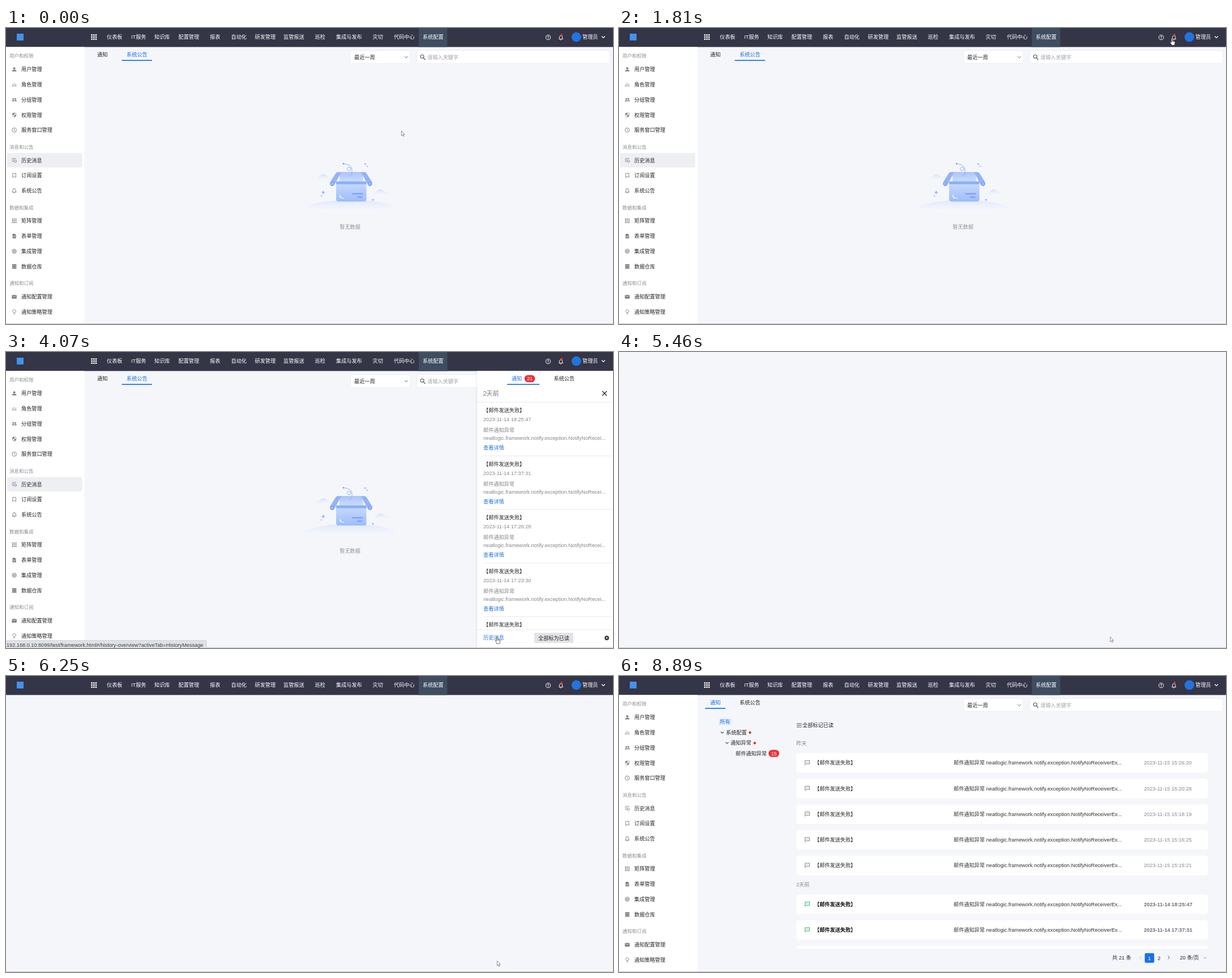
An HTML page that plays this animation: 1072 by 522 pixels, repeating every 9510 ms.

```html
<!DOCTYPE html>
<html lang="zh-CN">
<head>
<meta charset="utf-8">
<title>历史消息</title>
<style>
html, body { margin: 0; width: 100%; height: 100%; overflow: hidden; background: #f4f6fa; }
svg { display: block; width: 1072px; height: 522px; }
text { font-family: "Liberation Sans", "Noto Sans CJK SC", "Noto Sans CJK", sans-serif; white-space: pre; }
</style>
</head>
<body>
<svg id="stage" viewBox="0 0 1072 522" xmlns="http://www.w3.org/2000/svg"></svg>
<script>
const LOOP = 9510;
const BLUE = '#1a70eb', INK = '#262626', GREY = '#85878c', RED = '#ee2f30', ICON = '#7c7c7c', PALE = '#a2a2a2';
const SIZE = 9.17;

// y is the visual middle of the line
const text = (x, y, s, fill = INK, size = SIZE, extra = '') =>
  `<text x="${x}" y="${y + size * 0.37}" font-size="${size}" fill="${fill}" ${extra}>${s}</text>`;
const rect = (x, y, w, h, fill, r = 0, extra = '') =>
  `<rect x="${x}" y="${y}" width="${w}" height="${h}" rx="${r}" fill="${fill}" ${extra}/>`;
const disc = (x, y, r, fill) => `<circle cx="${x}" cy="${y}" r="${r}" fill="${fill}"/>`;
const ring = (x, y, r, color, w = 0.9) =>
  `<circle cx="${x}" cy="${y}" r="${r}" fill="none" stroke="${color}" stroke-width="${w}"/>`;
const line = (d, color, w = 1) =>
  `<path d="${d}" fill="none" stroke="${color}" stroke-width="${w}"/>`;
const shape = (d, fill) => `<path d="${d}" fill="${fill}"/>`;
const at = (x, y, body) => `<g transform="translate(${x} ${y})">${body}</g>`;
const group = (id, body) => `<g id="${id}">${body}</g>`;
const down = (x, y, color, r = 2.6, w = 1.1) =>
  line(`M${x - r} ${y - r / 2}l${r} ${r}l${r} ${-r}`, color, w);
const badge = (x, y, w, s) =>
  rect(x, y - 6.3, w, 12.6, RED, 6.3) + text(x + w / 2, y, s, '#fff', SIZE, 'text-anchor="middle"');

function dots(size, gap, fill) {
  let s = '';
  for (let i = 0; i < 9; i++)
    s += rect((i % 3 - 1) * gap - size / 2, (Math.floor(i / 3) - 1) * gap - size / 2, size, size, fill);
  return s;
}
const bell = color =>
  line('M-3.6 2.6H3.6L2.6 1.2V-.8A2.6 2.6 0 0 0-2.6-.8V1.2ZM-1 4H1M0-4.4V-3.4', color, 0.95);

function header() {
  const menu = [[178, '仪表板'], [221, 'IT服务'], [262, '知识库'], [304.5, '配置管理'], [360, '报表'],
    [397.5, '自动化'], [439.5, '研发管理'], [490, '监管报送'], [545.5, '巡检'], [583, '集成与发布'],
    [647.5, '灾切'], [685, '代码中心'], [736, '系统配置']];
  return rect(0, 0, 1072, 33.5, '#343546') + rect(729, 0, 50.3, 33.5, '#3e4d60') +
    rect(19, 10, 12, 12, '#4292f0') + at(155.3, 16, dots(2.5, 3.7, '#fff')) +
    menu.map(([x, s]) => text(x, 16, s, '#fff')).join('') +
    ring(957.5, 16.5, 4.1, '#fff', 1) + text(957.5, 16.6, '?', '#fff', 6.4, 'text-anchor="middle" font-weight="bold"') +
    at(980, 17, bell('#fff')) + disc(981.2, 12.3, 2, RED) +
    disc(1007.3, 16, 8.5, '#2274e0') + text(1018, 16, '管理员', '#fff') + down(1055, 16, '#fff', 2.9, 1.3);
}

const icons = [
  disc(0, -1.8, 1.9, ICON) + shape('M-3.8 3.6V2.4C-3.8.2 3.8.2 3.8 2.4V3.6Z', ICON),
  line('M-3.8 2.6C-3.8.6-1.6.6-1.6 2.6M-1.9 2.6C-1.9-.2 1.9-.2 1.9 2.6M1.6 2.6C1.6.6 3.8.6 3.8 2.6M-4.2 2.8H4.2', PALE, .7) +
    ring(0, -1.6, 1.1, PALE, .7) + ring(-2.7, -.2, .8, PALE, .6) + ring(2.7, -.2, .8, PALE, .6),
  disc(-1.7, -1.3, 1.4, ICON) + disc(1.9, -1.3, 1.4, ICON) + shape('M-4.4 2.7C-4.4 0 .8 0 .8 2.7ZM1.4 2.7C1.4 1.6 1 1 .6.7C2 .3 4.4.8 4.4 2.7Z', ICON),
  line('M0-3.8L3.2-2.4V0C3.2 2 2 3.2 0 3.9C-2 3.2-3.2 2-3.2 0V-2.4Z', ICON, .8) +
    shape('M0-3.8V0H3.2C3.2 2 2 3.2 0 3.9V0H-3.2V-2.4Z', ICON),
  ring(0, 0, 3.9, ICON) + line('M0-2.4V.2L1.8 1.2', ICON, .9),
  line('M-4-3.2H3.6M-4-.6H0M-4 2H-.6', ICON, .9) + ring(2, 1.6, 2, ICON),
  line('M-2.8-3.7H2.8V3.6L0 1.6L-2.8 3.6Z', ICON, .9),
  bell(ICON),
  dots(1.9, 3, ICON),
  shape('M-3-4H1L3-2V4H-3Z', ICON) + line('M-1.7-.2H1.7M-1.7 1.8H1.7', '#fff', .8),
  ring(0, 0, 3.8, ICON) + ring(0, 0, 2.1, ICON) + disc(0, 0, .9, ICON),
  [-2.9, 0, 2.9].map(y => rect(-4, y - 1.2, 8, 2.4, ICON, 1.1)).join(''),
  rect(-4.2, -3.2, 8.4, 6.4, ICON, .7) + line('M-3.6-2.2L0 .4L3.6-2.2', '#fff', .8),
  line('M-1.2 2.2V1.2A2.7 2.7 0 1 1 1.2 1.2V2.2ZM-1.1 3.8H1.1', ICON, .9)
];

function sidebar() {
  const heads = [[49, '用户和权限'], [210, '消息和公告'], [317, '数据和集成'], [450, '通知和订阅']];
  const items = [[73, '用户管理'], [100, '角色管理'], [126.5, '分组管理'], [153.3, '权限管理'],
    [180, '服务窗口管理'], [233.3, '历史消息'], [260, '订阅设置'], [286.8, '系统公告'], [340, '矩阵管理'],
    [367, '表单管理'], [393.7, '集成管理'], [420.5, '数据仓库'], [474, '通知配置管理'], [500.5, '通知策略管理']];
  return rect(0, 33.5, 138.5, 487.5, '#fff') + group('current', rect(2, 220.5, 132.5, 25.5, '#eeeff3', 3)) +
    heads.map(([y, s]) => text(6, y, s, '#8b8d92', 8.5)).join('') +
    items.map(([y, s], i) => at(14.6, y, icons[i]) + text(27, y, s)).join('');
}

const tools = () =>
  rect(608.5, 40, 105.5, 22.5, '#fff', 3, 'stroke="#e9ebf0" stroke-width=".7"') +
  text(615, 51.3, '最近一周') + down(707, 51.3, '#666', 3, 1) +
  rect(725.5, 40, 340.5, 22.5, '#fff', 3, 'id="search" stroke="#e9ebf0" stroke-width=".7"') +
  ring(735, 50.3, 3, '#555', 1.1) + line('M737.2 52.6L740.6 56', '#555', 1.3) +
  text(744, 51.3, '请输入关键字', '#a0a2a8');

const tabs = (first, x, w) =>
  text(161, 46.5, '通知', first ? BLUE : INK) + text(213, 46.5, '系统公告', first ? INK : BLUE) +
  rect(x, 56.3, w, 1.7, BLUE);

const star = (x, y, r) =>
  shape(`M${x} ${y - r}Q${x} ${y} ${x + r} ${y}Q${x} ${y} ${x} ${y + r}Q${x} ${y} ${x - r} ${y}Q${x} ${y} ${x} ${y - r}Z`, '#9bb9f8');
const cloud = (x, y) => shape(`M${x} ${y}Q${x + 4} ${y - 3} ${x + 7} ${y - 5}Q${x + 14} ${y - 12} ${x + 20} ${y - 5}Q${x + 25} ${y - 3} ${x + 28} ${y}Z`, 'url(#cloud)');

function empty() {
  const flap = shape('M592 254H585.5Q582.5 255 580.5 259L572.5 272Q571 277 575.5 279Q579 279 583 271Z', '#94b3f8') +
    disc(576.3, 274.8, 3.6, '#7fa3f4') + disc(576.3, 274.8, 1.6, '#b8cdfb');
  return shape('M527 317C552 299 664 299 688 317C680 329 536 329 527 317Z', 'url(#ground)') +
    cloud(547, 266) + cloud(648, 293) +
    rect(589, 254, 41.5, 20, 'url(#inside)', 1) +
    line('M596 239.5C605 240 612 244 611 252C610 260 611 258 606 261', '#86a8f6', .9) + ring(605.7, 248.5, 3.1, '#86a8f6') +
    disc(596, 239.4, 1.3, '#6e97f4') + flap + `<g transform="translate(1219 0) scale(-1 1)">${flap}</g>` +
    rect(583, 271, 53.5, 35, 'url(#carton)', 4) + rect(583, 270.5, 53.5, 5, '#8baef8', 1) +
    shape('M589.5 293Q588 298 591.5 300Q594 301 594.5 299.5Q590.5 298.5 589.5 293Z', '#fff') + disc(596.3, 300, .9, '#fff') +
    rect(611, 291, 20, 2.4, '#7ea4f7', 1) + rect(620, 297, 9.5, 2.4, '#7ea4f7', 1) +
    star(634.5, 240, 3) + star(638, 244, 2) + star(560.3, 290, 4.8) + star(557, 296, 2.6) + star(648, 303, 3.4) +
    text(589.3, 351, '暂无数据', '#929499');
}

const TITLE = '【邮件发送失败】', CLASS = 'neatlogic.framework.notify.exception.NotifyNoRecei';

function panelItems() {
  const times = ['18:25:47', '17:37:31', '17:26:28', '17:23:30', '17:20:12'];
  return times.map((time, i) => at(843, 103 + i * 94.45,
    text(0, 0, TITLE) + text(0, 16, '2023-11-14 ' + time, GREY) + text(0, 35, '邮件通知异常', GREY) +
    text(0, 49, CLASS + '...', GREY) + text(0, 66, '查看详情', BLUE) + rect(0, 79.8, 229, .8, '#e3e5ea'))).join('');
}

const gear = () => {
  let teeth = '';
  for (let a = 0; a < 360; a += 45) teeth += `<rect x="-.9" y="-4.2" width="1.8" height="2" fill="#222" transform="rotate(${a})"/>`;
  return ring(0, 0, 2.3, '#222', 1.7) + teeth;
};

const panel = () =>
  rect(828, 33.5, 4, 487.5, 'url(#shade)') + rect(832, 33.5, 240, 487.5, '#fff') +
  text(893, 46.5, '通知', BLUE) + rect(885, 56.3, 57, 1.7, BLUE) + text(967.5, 46.5, '系统公告') +
  line('M1053 69L1061 77M1061 69L1053 77', '#222', 1.3) + rect(832, 88, 240, .8, '#e3e5ea') +
  group('messages', badge(915.7, 47, 18.6, '21') + text(842.5, 73, '2天前', '#77797e', 11) + panelItems()) +
  rect(832, 490, 240, 31, '#fff') + rect(832, 489.6, 240, .8, '#e3e5ea') +
  text(843, 504, '历史消息', INK, SIZE, 'id="link"') +
  rect(933, 495.3, 69, 17.7, '#e2e3e6', 1.5) + text(940, 504.2, '全部标为已读') + at(1061, 504.3, gear());

const tree = () =>
  rect(176, 75, 22.5, 11.5, '#e3eefd', 1.5) + text(178, 80.7, '所有', BLUE) +
  down(182.3, 99.6, '#444') + text(189, 99.5, '系统配置') + disc(231.3, 99.8, 2.3, RED) +
  down(190.8, 118, '#444') + text(197, 118, '通知异常') + disc(239.7, 118.2, 2.3, RED) +
  text(206, 136.3, '邮件通知异常') + badge(264, 136.5, 19, '15');

function card(y, time, unread) {
  const color = unread ? '#27a86b' : '#777';
  const bold = unread ? 'font-weight="bold"' : '';
  return rect(313, y - 17.2, 727, 34.6, '#fff', 5) +
    at(332.6, y - .3, line('M-4-3.6H4V2.2H-2L-4 4Z', color, .9) + [-2, 0, 2].map(x => disc(x, -.7, .6, color)).join('')) +
    text(345, y, TITLE, unread ? '#111' : INK, SIZE, bold) +
    text(591, y, `邮件通知异常 ${CLASS}verEx...`, '#333') +
    text(927, y, time, unread ? '#6d6f74' : GREY, SIZE, bold);
}

const list = () =>
  line('M314 84H322.5M314 87H322.5M314 90H319', '#333', .9) + line('M319.5 89.6L320.8 91L323 88.6', '#333', .8) +
  text(324, 87, '全部标记已读') + text(313, 119, '昨天', GREY) +
  ['26:20', '20:28', '18:19', '16:25', '15:21'].map((s, i) => card(153 + i * 45.25, '2023-11-15 15:' + s)).join('') +
  text(313, 368, '2天前', GREY) +
  `<g clip-path="url(#view)">` +
  ['18:25:47', '17:37:31', '17:26:28'].map((s, i) => card(402.5 + i * 45.2, '2023-11-14 ' + s, true)).join('') + '</g>';

const pager = () =>
  text(871, 497, '共 21 条') + line('M922 494L919.4 496.7L922 499.4', '#b9bbc2', 1) +
  rect(928.5, 488.8, 16.7, 17, BLUE, 2) + text(934.3, 497.3, '1', '#fff') + text(951.3, 497.3, '2') +
  line('M969.6 493.6L972.4 496.5L969.6 499.4', '#444', 1) + text(990.5, 496.5, '20 条/页') + down(1035, 497, '#888', 2.6, .9);

const status = () =>
  rect(-1, 508.5, 355, 14, '#dfe1e5', 1.5, 'stroke="#c3c5c9" stroke-width=".6"') +
  text(1, 516.8, '192.168.0.10:8099/test/framework.html#/history-overview?activeTab=HistoryMessage', '#3c4043');

const outline = (color, w) => `fill="#fff" stroke="${color}" stroke-width="${w}" stroke-linejoin="round"`;
const arrow = `<path d="M.4.4V8.8L2.3 7.1L3.6 10.1L4.9 9.5L3.7 6.6H6.2Z" ${outline('#555', .65)}/>`;
const hand = `<path d="M-1 1Q0-.6 1 1V5L2.2 4.8L3.4 5.2L4.8 5.9Q5.4 6.4 5.3 7.6L4.6 10.2V12.3H-1V11L-3.2 8Q-4 6.6-2.8 6.4L-1 7.7Z" ${outline('#333', .7)}/>` +
  line('M1 5V7.2M2.7 5.2V7.2M4.1 5.8V7.4', '#333', .5);

const fade = (id, from, to, toOpacity = 1, dir = 'x2="0" y2="1"') =>
  `<linearGradient id="${id}" x1="0" y1="0" ${dir}><stop stop-color="${from}"/><stop offset="1" stop-color="${to}" stop-opacity="${toOpacity}"/></linearGradient>`;

document.getElementById('stage').innerHTML = '<defs>' +
  fade('ground', '#dfe7fb', '#f9fbff', .5) + fade('cloud', '#d5e0fb', '#eef2fb', .5) +
  fade('inside', '#a9c4fb', '#d2e0fd') + fade('carton', '#cbdcfd', '#9cbcfa') +
  `<linearGradient id="shade"><stop stop-color="#9aa" stop-opacity="0"/><stop offset="1" stop-color="#9aa" stop-opacity=".16"/></linearGradient>` +
  `<clipPath id="view"><rect x="313" y="380" width="727" height="101"/></clipPath></defs>` +
  rect(0, 0, 1072, 522, '#f4f6fa') + group('header', header()) + group('sidebar', sidebar()) +
  group('tools', tools()) + group('tabNews', tabs(false, 204.5, 53.5)) + group('tabNotice', tabs(true, 152, 36)) +
  group('empty', empty()) + group('tree', tree()) + group('list', list()) + group('pager', pager()) +
  group('panel', panel()) + rect(0, 521, 1072, 1, '#c4c6ca') + group('status', status()) +
  group('cursor', group('arrow', arrow) + group('hand', hand));

// element id, then pairs of show / hide times
const shown = {
  header: [0, 5380, 6180, LOOP], sidebar: [0, 5380, 6260, LOOP], current: [0, 5380],
  tools: [0, 5380, 6340, LOOP], tabNews: [0, 5380], tabNotice: [6340, LOOP], empty: [0, 5380],
  tree: [6570, LOOP], list: [6720, LOOP], pager: [6720, LOOP],
  panel: [1960, 5380], messages: [2040, 5380], status: [3840, 5460],
  cursor: [0, 8890], hand: [1720, 5460], arrow: [0, 1720, 5460, 8890]
};

// start, end, steps, then points as [progress, x, y]
const moves = [
  [70, 1000, 13, [[0, 698, 181], [.5, 805, 118], [1, 955, 34]]],
  [1090, 1240, 3, [[0, 955, 34], [1, 974, 18]]],
  [1720, 1810, 2, [[0, 974, 18], [1, 976.7, 18]]],
  [2270, 3200, 13, [[0, 976.7, 18], [.46, 952.7, 254.5], [.8, 880, 420], [1, 853, 465]]],
  [3280, 4070, 11, [[0, 853, 465], [.6, 864, 494], [1, 867.5, 502]]],
  [5460, 5710, 2, [[0, 867.5, 502], [1, 867, 502]]],
  [8270, 8580, 5, [[0, 867, 502], [.4, 925, 497], [1, 1009, 517]]],
  [8810, 8890, 2, [[0, 1009, 517], [1, 1014, 521]]]
];

function cursorAt(t) {
  const next = moves.filter(m => t >= m[0]).pop();
  if (!next) return [698, 181];
  const [start, end, n, pts] = next;
  const step = Math.floor((t - start + 1) / ((end - start) / (n - 1))) + 1;
  const p = Math.min(1, step / n);
  const i = Math.max(1, pts.findIndex(q => q[0] >= p));
  const [a, b] = [pts[i - 1], pts[i]];
  const k = (p - a[0]) / (b[0] - a[0]);
  return [a[1] + (b[1] - a[1]) * k, a[2] + (b[2] - a[2]) * k];
}

const el = id => document.getElementById(id);
const parts = Object.entries(shown).map(([id, spans]) => [el(id), spans]);
const cursor = el('cursor'), search = el('search'), link = el('link');

function draw(t) {
  for (const [node, spans] of parts) {
    const on = spans.some((from, i) => i % 2 === 0 && t >= from && t < spans[i + 1]);
    node.style.display = on ? '' : 'none';
  }
  cursor.setAttribute('transform', `translate(${cursorAt(t).join(' ')})`);
  search.setAttribute('stroke', t >= 845 && t < 1160 ? '#7fb0f5' : '#e9ebf0');
  link.setAttribute('fill', t >= 3760 ? BLUE : INK);
}

const began = performance.now();
function tick() {
  draw((performance.now() - began) % LOOP);
  requestAnimationFrame(tick);
}
tick();
</script>
</body>
</html>
```
